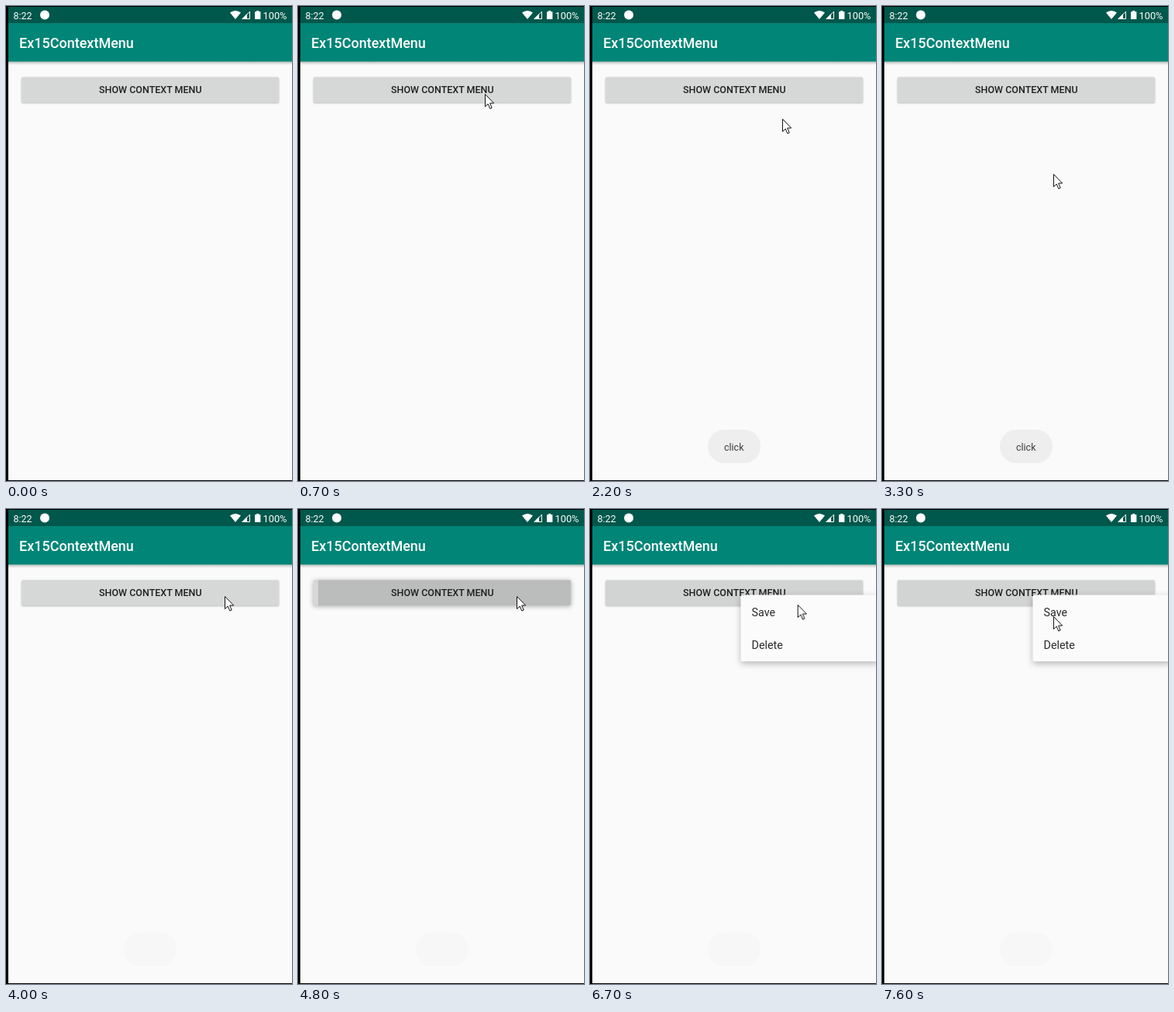
An HTML page that plays this animation: 369 px wide and 611 px high, repeating every 8000 ms.

```html
<!DOCTYPE html>
<html lang="en">
<head>
<meta charset="utf-8">
<title>Context menu demo</title>
<style>
  html, body { margin: 0; width: 100%; height: 100%; overflow: hidden; background: #000; }
  svg { display: block; width: 369px; height: 611px; font: 400 12.5px Roboto, "Noto Sans", sans-serif; }
  .medium { font-weight: 500; }

  #button, #ripple, #toast, #label, #menu, #cursor { animation: 8s step-end infinite; }
  #button { filter: drop-shadow(0 1px 1px #0004); animation-name: lift; }
  #ripple { opacity: 0; animation-name: ripple; }
  #toast { opacity: 0; animation-name: toast; }
  #label { opacity: 0; animation-name: label; }
  #menu { opacity: 0; filter: drop-shadow(0 3px 4px #0004); animation-name: menu; }
  #cursor { animation-name: move; }

  @keyframes lift {
    0%, 65% { filter: drop-shadow(0 1px 1px #0004); }
    60% { filter: drop-shadow(0 1px 3px #0005); }
  }

  @keyframes ripple {
    0% { opacity: 0; clip-path: inset(0 0 0 6px); }
    16.25% { opacity: 1; clip-path: inset(0 0 0 6px); }
    17.5% { opacity: 1; clip-path: inset(0); }
    18.75% { opacity: 1; clip-path: inset(0); animation-timing-function: steps(3, jump-start); }
    22.5% { opacity: 0; clip-path: inset(0); }
    60% { opacity: 1; clip-path: inset(0 0 0 6.5px); }
    61.25% { opacity: 1; clip-path: inset(0); }
    65% { opacity: 1; clip-path: inset(0); animation-timing-function: steps(3, jump-start); }
    68.75%, 100% { opacity: .12; clip-path: inset(0); }
  }

  /* a faint trace of the bubble stays behind */
  @keyframes toast {
    0% { opacity: 0; }
    18.75% { opacity: 0; animation-timing-function: steps(4, jump-start); }
    23.75% { opacity: 1; }
    45% { opacity: 1; animation-timing-function: steps(4, jump-start); }
    50%, 100% { opacity: .25; }
  }

  @keyframes label {
    0% { opacity: 0; }
    18.75% { opacity: 0; animation-timing-function: steps(4, jump-start); }
    23.75% { opacity: 1; }
    45% { opacity: 1; animation-timing-function: steps(4, jump-start); }
    50%, 100% { opacity: 0; }
  }

  @keyframes menu {
    0% { opacity: 0; }
    65% { opacity: 0; animation-timing-function: steps(3, jump-start); }
    68.75%, 100% { opacity: 1; }
  }

  /* the pointer is sampled ten times a second */
  @keyframes move {
    0% { transform: translate(400px, 110px); }
    1.25% { transform: translate(376px, 111px); animation-timing-function: steps(2, jump-start); }
    3.75% { transform: translate(314px, 163px); animation-timing-function: step-start; }
    5% { transform: translate(278px, 161px); animation-timing-function: steps(2, jump-start); }
    7.5% { transform: translate(250px, 117px); animation-timing-function: step-start; }
    8.75% { transform: translate(243px, 95px); animation-timing-function: step-start; }
    10% { transform: translate(241px, 113px); }
    26.25% { transform: translate(241px, 113px); animation-timing-function: steps(2, jump-start); }
    28.75% { transform: translate(248px, 145px); animation-timing-function: steps(3, jump-start); }
    32.5% { transform: translate(240px, 230px); }
    40% { transform: translate(240px, 230px); animation-timing-function: steps(4, jump-start); }
    45% { transform: translate(202px, 202px); animation-timing-function: steps(5, jump-start); }
    51.25% { transform: translate(282px, 112px); }
    81.25% { transform: translate(282px, 112px); animation-timing-function: steps(9, jump-start); }
    92.5% { transform: translate(239px, 145px); animation-timing-function: steps(3, jump-start); }
    96.25%, 100% { transform: translate(221px, 138px); }
  }
</style>
</head>
<body>
<svg viewBox="0 0 369 611">
  <defs>
    <linearGradient id="shade" x2="0" y2="1">
      <stop stop-color="#b4b8b7"/>
      <stop offset="1" stop-color="#fafafa"/>
    </linearGradient>
  </defs>

  <rect x="3" y="1" width="366" height="609" fill="#fafafa"/>
  <rect x="3" y="71" width="366" height="5" fill="url(#shade)"/>
  <rect x="3" y="22" width="366" height="49.5" fill="#008577"/>
  <rect x="3" y="1" width="366" height="21" fill="#00574b"/>

  <g fill="#fff">
    <text x="9.5" y="16.5">8:22</text>
    <circle cx="50" cy="11.5" r="6"/>
    <path d="M289 8.5Q296 3.5 303 8.5L296 17Z"/>
    <path d="M304 17L311 10V17Z"/>
    <path d="M305.2 16.5L314.5 7.2V16.5Z" fill="none" stroke="#fff"/>
    <path d="M321 7.2h2.2V6h3v1.2h2.2V17H321Z"/>
    <text x="331.5" y="16.5" font-size="12.8">100%</text>
    <text class="medium" x="17" y="54" font-size="18">Ex15ContextMenu</text>
  </g>

  <rect id="button" x="20" y="91.5" width="332" height="32.5" rx="1.5" fill="#d6d7d7"/>
  <rect id="ripple" x="20" y="91.5" width="332" height="32.5" rx="1.5" fill="#bbbcbc"/>
  <text class="medium" x="120" y="112.3" fill="#202020">SHOW CONTEXT MENU</text>

  <rect id="toast" x="152" y="545" width="68" height="43" rx="21" fill="#eee"/>
  <text id="label" x="173" y="571.5" fill="#3c3c3c">click</text>

  <g id="menu" font-size="14.3" fill="#2a2a2a">
    <rect x="194.5" y="110.5" width="178" height="85.5" rx="2" fill="#fbfbfb"/>
    <text x="208.5" y="137.6">Save</text>
    <text x="208.5" y="180.4">Delete</text>
  </g>

  <path id="cursor" d="M.5 .5V16.5L4.2 13L6.8 19L9.2 18L6.7 12H11.7Z" fill="#fff" stroke="#111"/>
</svg>
</body>
</html>
```
